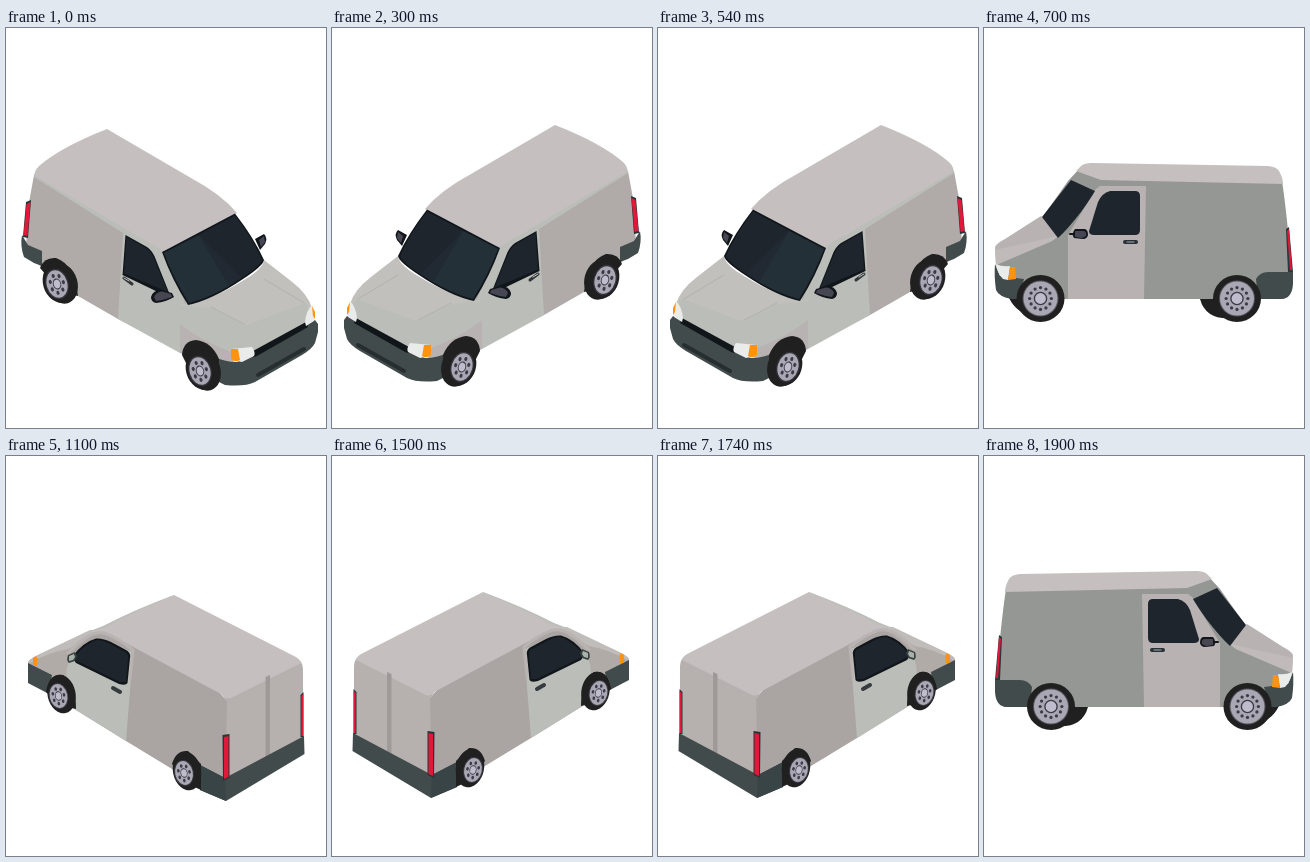
An HTML page for the animation above (2300 ms loop, 320x400 px).

```html
<!DOCTYPE html>
<html lang="en">
<head>
<meta charset="utf-8">
<title>Turning van</title>
<style>
html, body { margin: 0; width: 100%; height: 100%; overflow: hidden; background: #fff; }
svg { display: block; width: 320px; height: 400px; }
</style>
</head>
<body>
<svg id="stage" viewBox="0 0 320 400"></svg>
<script>
const C = {
  roof: '#c5bfbf', side: '#b0aaa8', warm: '#b8b2b2', cool: '#bbbeb8', grey: '#949793',
  glass: '#1f252d', sheen: '#243038', black: '#11161a', tyre: '#1f201f',
  bumper: '#424b4b', rim: '#aaa7b5', rimDark: '#3b3b45', mirror: '#474753',
  red: '#e0183a', amber: '#ff930f', lamp: '#e9eceb'
};

const shape = (fill, d) => `<path fill="${fill}" d="${d}"/>`;
const line = (stroke, width, d) =>
  `<path fill="none" stroke="${stroke}" stroke-width="${width}" stroke-linecap="round" d="${d}"/>`;
const ellipse = (fill, x, y, rx, ry, tilt = 0) =>
  `<ellipse fill="${fill}" rx="${rx}" ry="${ry}" transform="translate(${x} ${y}) rotate(${tilt})"/>`;

// Rim with a ring of holes around the hub
function rim(x, y, rx, ry, tilt, holes, holeSize) {
  let dots = '';
  for (let i = 0; i < holes; i++) {
    const a = i / holes * 2 * Math.PI;
    dots += `<circle fill="${C.rimDark}" cx="${.64 * Math.cos(a)}" cy="${.64 * Math.sin(a)}" r="${holeSize}"/>`;
  }
  return `<g transform="translate(${x} ${y}) rotate(${tilt}) scale(${rx} ${ry})">
    <circle r="1" fill="${C.rim}"/>${dots}
    <circle r=".36" fill="#bfbdcd" stroke="${C.rimDark}" stroke-width=".08"/></g>`;
}

const slantedWheel = (x, y) =>
  ellipse(C.tyre, x + 3, y + 1, 15.5, 20.5, -16) +
  ellipse(C.tyre, x, y, 16, 20.5, -16) +
  ellipse('#34343b', x - 2, y + 1.5, 11.5, 15.5, -16) +
  rim(x - 2, y + 1.5, 10.3, 14, -16, 7, .15);

const rearWheel = (x, y) =>
  ellipse(C.tyre, x, y, 14, 19.5, -12) +
  ellipse('#3c3c43', x - 3, y + 2, 9.8, 13, -12) +
  rim(x - 3, y + 2, 8.8, 12, -12, 7, .15);

const sideWheel = (x, y) =>
  ellipse(C.tyre, x, y, 24, 23.5) +
  ellipse('#55555c', x, y, 18, 18) +
  rim(x, y, 17, 17, 0, 12, .095);

const front =
  shape(C.side, 'M28 147L118 202 158 221 181 276 186 328 112 291 72 268 34 238 20 221 22 180Z') +
  shape(C.roof, 'M28 149Q28 143 33 138Q55 119 101 101L185 150Q215 166 231 185L156 224Q141 212 117 201Z') +
  shape(C.cool, 'M28 147L118 200 157 223 180 277 174 277 174 325 112 291 117 205 28 149Z') +
  shape(C.warm, 'M174 276L182 278 207 315 226 321 228 337 208 332 186 331 174 325Z') +
  shape('#c1c0bc', 'M180 276Q204 273 238 252Q257 241 258 232L285 253Q302 266 306 280L304 297 247 327 226 324Q198 314 174 296V276Z') +
  shape(C.cool, 'M205 280L240 297 299 275Q304 279 304 297L247 327 226 324Q198 314 174 296V277Z') +
  line('#b1b1ad', 1, 'M205 279L238 296M258 251L298 275') +
  shape(C.black, 'M156 224L229 185.5Q248 210 258 232Q257 238 237 251Q206 272 182 277Q166 252 156 224Z') +
  shape(C.glass, 'M158 225L229 187.5Q247 211 256 232Q254 238 236 250Q207 269 183 275Q168 251 158 225Z') +
  shape('#212a33', 'M193 207L235 250 223 258Z') +
  shape(C.sheen, 'M158 225L193 207 223 258Q202 270 183 275Q168 251 158 225Z') +
  shape(C.black, 'M119.5 207L141 219Q147 223 150 232L164 267 154 265 116.5 247Z') +
  shape(C.glass, 'M120.5 209L140 220Q146 224 149 233L162 264 118 245.5Z') +
  shape(C.black, 'M145 269Q147 262 155 262L166 265 168 269Q160 274 150 275Q145 274 145 269Z') +
  shape(C.mirror, 'M148 269Q150 264 156 263.5L165 266 166 269Q158 272 150 273Z') +
  shape(C.black, 'M249 211L258 206Q262 210 259 216L254 222Z') +
  shape(C.mirror, 'M253 212L258 208 259 214 255 219Z') +
  line('#30363a', 3, 'M118 250L126 256') + line('#c2c4c0', 1, 'M118 250L123 253') +
  shape(C.bumper, 'M16 207L22 217 36 223V238L28 235 18 229Q14 218 16 207Z') +
  shape('#26343a', 'M20 174L25 172 22 210 17 209Z') +
  shape(C.red, 'M20.5 176L24.5 174 21.5 208 17.5 207Z') +
  shape(C.tyre, 'M34 240Q38 229 50 230Q68 236 72 268L55 264Z') +
  shape(C.bumper, 'M207 328Q218 334 231 334L247 327 309 292 312 296V304L309 315Q306 321 296 327L249 354Q239 359 219 357L209 352Z') +
  shape(C.black, 'M247 323L300 294 302 299 250 328.5 247 329Z') +
  line('#262e30', 4, 'M252 347L298 321') +
  shape(C.tyre, 'M176 327Q177 313 190 312Q206 314 213 331L212 345H185Z') +
  shape(C.lamp, 'M225 321L246 319Q250 325 248 328L236 334 226 332Z') +
  shape(C.amber, 'M225 321L232 321 234 332Q229 335 225 331Z') +
  shape(C.lamp, 'M299 294Q300 283 306 277L309 288 308 293 300 298Z') +
  shape(C.amber, 'M306 278L309 284 309 291 307 288Z') +
  slantedWheel(53, 254.5) + slantedWheel(196, 341.5);

const side =
  shape(C.tyre, 'M25 270H50V288Q33 286 25 270ZM216 271H250V290Q222 293 216 271Z') +
  shape(C.grey, 'M84 153L97 139 298 153Q303 185 308 248V260L300 271H35L15 245 12 237 58 190Z') +
  shape(C.roof, 'M92 143L97 138Q100 135 108 135L284 138Q293 139 295 143Q299 150 299 156L117 152Z') +
  shape(C.warm, 'M57 188L75 208 68 213 12 237 11 219Q13 215 21 211Z') +
  shape('#c0bbba', 'M11 222L74 208 68 213 12 237Z') +
  shape(C.warm, 'M116 158H162L160 271H84V207L104 174Q109 162 116 158Z') +
  shape(C.glass, 'M87 152L111 163Q107 170 97 184Q83 202 74 210L58 189Z') +
  shape(C.glass, 'M126 163H151Q156 163 156 168V202Q156 207 151 207H110Q105 207 105 203L114 174Q118 165 126 163Z') +
  line(C.black, 2, 'M86 206H92') +
  shape(C.black, 'M91 201H101Q104 202 104 207Q103 211 99 211L90 210Q87 206 91 201Z') +
  shape(C.mirror, 'M91 203H100Q103 204 102 208L98 210 91 209Z') +
  line('#283137', 4, 'M141 214H152') + line('#a8abac', 1, 'M143 214H150') +
  shape(C.bumper, 'M11 236L16 248 40 251 34 271H28Q15 269 12 262Q10 248 11 236ZM272 251Q276 244 284 244H309V256Q308 271 297 271H274Z') +
  shape(C.lamp, 'M12 236Q18 239 26 238L24 252 19 251Q13 245 12 236Z') +
  shape(C.amber, 'M26 239H31L32 251 24 252Z') +
  shape('#29383b', 'M302 201L305 199 309 244H304Z') +
  shape(C.red, 'M303 203L305 201 308 242H306Z') +
  sideWheel(56.5, 270.5) + sideWheel(253, 270.5);

const back =
  shape('#aaa4a3', 'M62 190L97 174 213 236 221 245V325L194 330 120 285 70 254 40 236 22 207Z') +
  shape(C.cool, 'M66 197L104 187 127 196 120 285 70 254 58 235V219Z') +
  shape('#b1aba8', 'M22 206Q24 202 40 196L62 188 84 176 93 174 70 193Q60 201 60 225L46 221 22 209Z') +
  shape('#c0bcba', 'M22 206Q24 202 40 195L84 174 92 174 73 187 62 193Q43 196 22 208Z') +
  shape('#b6b1af', 'M216 238Q249 224 289 201Q297 205 297 213V283L219 326 221 246Z') +
  shape(C.cool, 'M168 139Q130 153 97 170L84 175 100 178Z') +
  shape(C.roof, 'M84 176L100 171Q130 155 168 139L288 200Q294 203 295 207L225 242Q221 244 215 238L103 178Q94 174 84 176Z') +
  line('#b9b4b2', 3, 'M62 197Q83 174 98 177Q111 181 127 194L124 223') +
  shape('#9f9998', 'M259.5 221L264 219V299L259.5 301Z') +
  shape(C.black, 'M66 201Q77 186 90 182.5Q97 182 105 186L121 194.5Q125 197 124 202L121.5 227Q120 230 113 228L70 207Z') +
  shape(C.glass, 'M68 201Q80 187 91 184Q97 184 104 188L120 196.5Q123 199 122 203L120 226 114 226 71 205Z') +
  shape('#37413f', 'M62 199L69 196 71 200 69 205 63 207Q60 204 62 199Z') +
  shape('#a9b1ac', 'M63 200L68 198 69 201 67 204 63 205Z') +
  line('#363b3f', 4, 'M107 232L114 236') +
  shape(C.bumper, 'M22 207L46 219 43 238 22 227ZM194 309L219 322 298 280 298.5 298 220 345 194 334Z') +
  shape('#394446', 'M194 309L219 322 220 345 194 334Z') +
  shape(C.amber, 'M27 202L30 200 32 203 31 210H27Z') +
  shape('#273537', 'M216.5 279L223.5 278V322L217 325ZM294.5 239L297.5 236V281H294.5Z') +
  shape(C.red, 'M218 281L222.5 280V321L218 323ZM295.3 240L297.2 238V280H295.3Z') +
  shape(C.tyre, 'M40 236Q43 217 57 219Q70 228 70 253L58 250ZM166 308Q170 294 182 295L195 308 195 334 180 327Z') +
  rearWheel(55.5, 238) + rearWheel(181, 315);

// Each pose: drawing, duration, mirror axis sum (0 = unmirrored), vertical shift
const poses = [
  [front, 300, 0, 0],
  [front, 400, 324, -4],
  [side, 400, 0, 0],
  [back, 400, 0, 0],
  [back, 400, 319, -3],
  [side, 400, 320, -20]
];

const stage = document.getElementById('stage');
stage.innerHTML = poses.map(([art, , flip, dy]) =>
  `<g visibility="hidden" transform="translate(${flip} ${dy}) scale(${flip ? -1 : 1} 1)">${art}</g>`).join('');

const loop = poses.reduce((sum, pose) => sum + pose[1], 0);
let shown = -1;

function draw(now) {
  let left = now % loop, i = 0;
  while (left >= poses[i][1]) left -= poses[i++][1];
  if (i !== shown) {
    stage.children[shown]?.setAttribute('visibility', 'hidden');
    stage.children[i].setAttribute('visibility', 'visible');
    shown = i;
  }
}

const start = performance.now();
function tick() {
  draw(performance.now() - start);
  requestAnimationFrame(tick);
}
tick();
</script>
</body>
</html>
```
